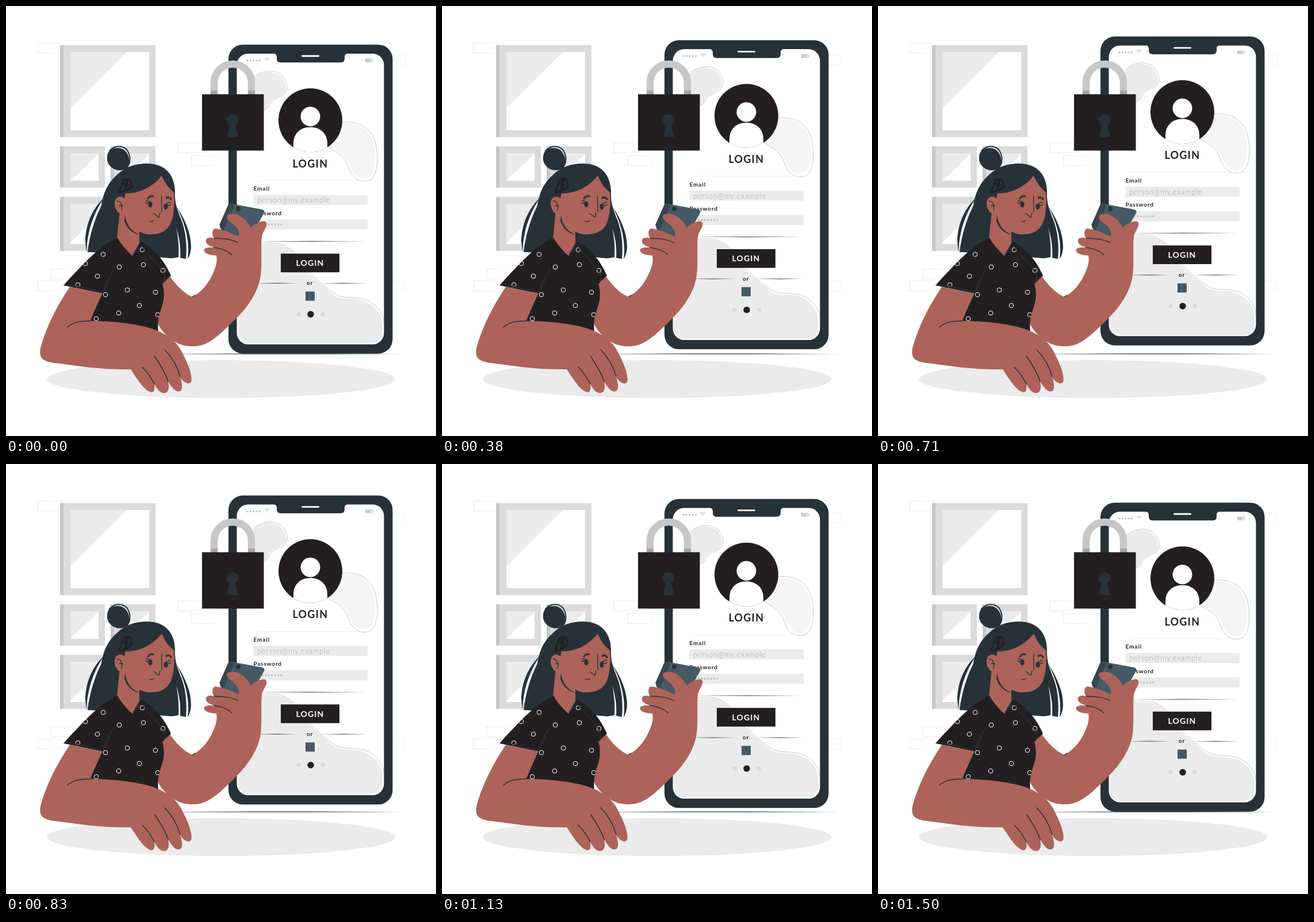
These frames come from a looping animation (748x748 px, 1540 ms). An HTML page:

```html
<!DOCTYPE html>
<html lang="en">
<head>
<meta charset="utf-8">
<title>Login</title>
<style>
  html, body { margin: 0; width: 100%; height: 100%; overflow: hidden; background: #fff; }
  svg { display: block; width: 100vw; height: 100vh; }
  text { font-family: Lato, sans-serif; font-weight: 700; fill: #231f20; }
  .slate { fill: #263238; }
  .ink { fill: #231f20; }
  .skin { fill: #ad6359; }
  .pale { fill: #ebebeb; }
  .line { fill: none; stroke: #263238; stroke-linecap: round; stroke-linejoin: round; }
  .edge { fill: none; stroke: #c9c9c9; }
</style>
</head>
<body>
<svg viewBox="0 0 748 748">
  <defs>
    <clipPath id="screen"><rect x="401.500" y="83" width="256" height="506" rx="20"/></clipPath>
    <clipPath id="avatar"><circle cx="529.500" cy="199" r="55.500"/></clipPath>
    <clipPath id="shirt"><path id="shirtShape" d="M194 403C165 416 139 443 100 486L167 500C160 516 152 533 146 548L160 572H266C261 548 268 535 273 516C276 504 275 493 272 483L287 469C277 447 262 424 235 410L230 424L220 434C208 426 200 414 194 403Z"/></clipPath>
    <linearGradient id="brick"><stop stop-color="#e6e6e6"/><stop offset="1" stop-color="#f5f5f5"/></linearGradient>
  </defs>

  <g id="bricks" fill="none" stroke="url(#brick)"></g>
  <g id="windows"></g>
  <ellipse class="pale" cx="374" cy="649" rx="303" ry="33"/>
  <path class="slate" d="M240 605.200L430 604.600H530L692 605.200L530 605.800H430Z"/>

  <g id="phone">
    <rect class="slate" x="387" y="67.500" width="285.500" height="537.500" rx="25"/>
    <g clip-path="url(#screen)">
      <path fill="#fff" d="M401 83H658V589H401Z"/>
      <path class="pale" d="M430 128C440 116 452 113 464 116C479 119 488 132 487 145C484 158 464 157 457 172C454 180 449 182 430 182Z"/>
      <path class="edge" d="M430 126C441 115 454 112 466 114C481 117 490 131 489 144C486 160 466 157 459 171C456 179 451 181 445 182"/>
      <path fill="#f5f5f5" d="M575 208C602 200 624 207 635 228C643 245 645 266 640 284C636 299 624 303 613 298C601 292 600 279 592 266C584 254 566 252 556 243Z"/>
      <path class="edge" d="M584 203C615 199 636 213 643 240C648 263 647 288 637 300C627 310 608 305 600 291C594 279 592 266 580 258C572 252 563 249 558 243"/>
      <path class="pale" d="M403 440C425 417 452 410 477 416C507 423 515 453 537 475C550 486 561 496 574 506C588 512 608 507 626 515C642 522 654 537 655 553V564C655 579 646 587 632 587H422C411 587 403 577 403 566Z"/>
      <path class="edge" d="M430 419C447 410 473 410 488 419C511 431 520 456 540 475C552 487 564 496 577 504C593 510 613 505 630 513C646 521 657 536 657 552"/>
    </g>
    <path class="slate" d="M465 82H595C590 84 589 86 589 89V92Q589 98.500 582 98.500H478Q471 98.500 471 92V89C471 86 470 84 465 82Z"/>
    <path d="M515.500 87.300H543.500" stroke="#fff" stroke-width="2.800" stroke-linecap="round"/>
    <path d="M420 95H442" stroke="#c7c7c7" stroke-width="3.600" stroke-linecap="round" stroke-dasharray="0 5.300"/>
    <g fill="none" stroke="#c7c7c7" stroke-width="1.200">
      <path d="M449.500 93Q454 89 458.500 93M451.500 95Q454 92.500 456.500 95M453.500 97H454.500"/>
      <path d="M625.500 92.500H636.500V97.500H625.500ZM638 94V96"/>
      <path d="M626 95H634" stroke-width="4"/>
    </g>
    <circle class="ink" cx="529.500" cy="199" r="55.500"/>
    <g fill="#fff" clip-path="url(#avatar)">
      <circle cx="529.500" cy="192.500" r="17"/>
      <path d="M500 260V240C500 221 513 211 529.500 211S559 221 559 240V260Z"/>
    </g>
    <text x="498.500" y="281" font-size="18" letter-spacing="1.200">LOGIN</text>
    <path d="M436 304H621" stroke="#eee"/>
    <text x="430.500" y="321.500" font-size="10" letter-spacing=".9">Email</text>
    <path class="pale" d="M430.500 329H629V346.500H430.500ZM430.500 371.500H629V389H430.500Z"/>
    <text x="437" y="342.500" font-size="13" letter-spacing=".7" style="font-weight:300;fill:#a6a6a6">person@my.example</text>
    <text x="430.500" y="364" font-size="10" letter-spacing=".8">Password</text>
    <path d="M441 380.300H480" stroke="#c4c4c4" stroke-width="3.600" stroke-linecap="round" stroke-dasharray="0 5.400"/>
    <g id="rules" class="slate"></g>
    <path class="ink" d="M478 431H580V463.500H478Z"/>
    <text x="504.500" y="452.300" font-size="14" letter-spacing="1.100" style="fill:#fff">LOGIN</text>
    <text x="523" y="485.500" font-size="10" letter-spacing=".8">or</text>
    <path fill="#455a64" d="M521 497H537V513H521Z"/>
    <g fill="#dbdbdb"><circle cx="509" cy="536.500" r="4"/><circle cx="551" cy="536.500" r="4"/></g>
    <circle class="ink" cx="530" cy="536.500" r="5.700"/>
  </g>

  <g id="lock">
    <path d="M362 154V133.500a32.500 32.500 0 0 1 65 0V154" fill="none" stroke="#c7c7c7" stroke-width="12.500"/>
    <path d="M356 147H368V154H356ZM421 147H433V154H421Z" fill="#a6a6a6"/>
    <path class="ink" d="M341 153.500H448.500V251.500H341Z"/>
    <circle class="slate" cx="394" cy="198.500" r="10.300"/>
    <path class="slate" d="M390 203H398L404 228H385Z"/>
  </g>

  <g id="hair" class="slate">
    <path d="M176 262C177 248 190 245 201 248C213 253 218 269 212 280C205 288 191 287 184 281C178 276 175 270 176 262Z"/>
    <path class="line" stroke-width="2" d="M180 252C190 240 211 241 215 261C217 272 213 279 208 284"/>
    <path d="M245 274C275 274 293 292 294 322C293 345 299 356 305 372C313 393 315 415 313 440L303 438C304 420 302 405 296 385C300 405 301 420 300 437L288 439L200 431L142 428C145 402 152 375 166 347C170 320 180 305 195 292C208 280 225 274 245 274Z"/>
    <path d="M170 334C149 354 138 382 138 410L140 428C141 396 150 364 170 334ZM296 348C312 372 322 395 322 420C321 430 319 436 316 440C320 412 313 380 296 348Z"/>
  </g>

  <g id="head">
    <path class="skin" d="M199 345L193 405L219 435L232 412V388Z"/>
    <path class="slate" d="M207 363C209 382 219 393 233 398C223 397 211 389 206 374Z"/>
    <path class="skin" d="M206 335C198 327 188 334 189 345C190 357 199 366 209 362C214 382 228 394 245 397C264 399 280 393 287 377C292 363 294 345 292 324C283 317 276 308 271 295C254 316 232 326 208 326Z"/>
    <path class="line" stroke-width="1.300" d="M193 339C200 340 203 346 201 355M197 348Q200 346 203 348M270.500 331L271 358M257 361L266 368L268 360M249 374Q253 377 257 373"/>
    <path class="line" stroke-width="3" d="M247 335Q250 330 256 331M279 334Q283 331 287 336"/>
    <g class="slate"><ellipse cx="251" cy="345" rx="3.500" ry="5.200"/><ellipse cx="278" cy="349" rx="3.500" ry="5.200"/></g>
    <path class="line" stroke-width="1.600" d="M250 340L244 339M248 343L243 343M279 344L286 341M281 347L287 346"/>
    <path d="M204 303L209 301L207 322L197 325ZM212 300L216 302L219 315L209 321ZM203 309L215 313" fill="none" stroke="#231f20" stroke-width="3" stroke-linejoin="round"/>
  </g>

  <g id="device">
    <path fill="#455a64" d="M392 344L446 354Q451 356 449 360L422 408L378 396L372 385L386 347Q388 343 392 344Z"/>
    <path fill="#37474f" d="M392 344Q388 343 386 347L371 381L378 391L397 348Z"/>
    <circle class="slate" cx="404" cy="353" r="4"/>
  </g>

  <path class="skin" d="M386 363C402 357 419 371 426 386C432 379 444 373 451 375C457 379 450 388 446 397C443 407 445 430 444 455C444 490 425 519 400 544C382 561 362 584 340 590C330 593 318 592 312 591C288 586 270 567 261 547L266 475L285 470C295 485 310 500 324 506C345 495 357 475 364 455C367 447 367 440 366 434C352 434 342 429 345 423C348 419 358 420 362 420C348 416 346 410 349 405C352 402 358 403 362 404C358 398 358 390 363 387C376 388 391 394 404 401C409 393 400 383 392 377C384 371 382 366 386 363Z"/>
  <path class="line" stroke-width="1.300" d="M362 404C377 404 393 406 404 412M362 420C375 422 386 426 393 433M324 506L329 503"/>

  <use href="#shirtShape" class="ink"/>
  <g id="rings" fill="none" stroke="#fff" clip-path="url(#shirt)"></g>
  <path class="line" stroke-width="1.500" d="M236 416C246 436 269 449 276 470C278 475 275 480 272 483M188 459C178 472 171 486 168 500M172 492L180 475M107 484L166 497"/>

  <path class="skin" d="M111 488.500L167 500L146 548C180 547 235 553 262 564C285 574 299 586 308 606C318 625 325 645 322 654C318 660 309 655 303 646C307 657 308 668 302 670C295 673 287 662 282 653C284 662 284 671 277 673C270 675 262 667 258 657C260 669 256 674 250 671C237 665 226 645 217 632C170 633 130 627 85 621C63 618 57 612 60 595C70 558 88 523 111 488.500Z"/>
  <path class="line" stroke-width="1.400" d="M107 559C116 550 128 548 146 548M237 628C245 636 252 646 258 657M258 609C267 622 277 637 282 653M276 598C287 609 297 624 303 644"/>
</svg>
<script>
const byId = id => document.getElementById(id);
const fill = (id, items, draw) => { byId(id).innerHTML = items.map(item => draw(...item)).join(''); };

fill('bricks', [[55, 64], [299, 238], [323, 260], [78, 457], [55, 478], [628, 64], [652, 85], [652, 478]],
  (x, y) => `<rect x="${x}" y="${y}" width="42" height="17.5"/>`);

// Wall frames: x, y, width, height, length of the reflection
fill('windows', [[94, 68, 166, 160, 98], [94, 244, 78, 72, 50], [182, 244, 78, 72, 50], [94, 332, 166, 94, 68]],
  (x, y, w, h, s) => `<path fill="#dbdbdb" d="M${x} ${y}h${w}v${h}h${-w}z"/>
    <path fill="#c7c7c7" d="M${x} ${y}h6v${h}h-6z"/>
    <path fill="#fff" d="M${x + 18} ${y + 12}h${w - 29}v${h - 24}h${29 - w}z"/>
    <path class="pale" d="M${x + 18} ${y + 12}h${s}l${-s} ${Math.min(s, h - 24)}z"/>`);

fill('rules', [[432, 628, 409.6], [432, 512, 482.6], [546, 628, 482.6]],
  (a, b, y) => `<path d="M${a} ${y}L${(a + b) / 2} ${y - .5}L${b} ${y}L${(a + b) / 2} ${y + .5}Z"/>`);

fill('rings', [[138, 448], [169, 432], [159, 470], [125, 485], [197, 454], [173, 502], [211, 494], [239, 450],
  [260, 498], [232, 521], [196, 534], [157, 544], [273, 460], [237, 424], [264, 537]],
  (x, y) => `<circle cx="${x}" cy="${y}" r="3.8"/>`);

const LOOP = 1540, PERIOD = 1500, LEAD = 25, RISE = 15, REST = 0.2;

function render(now) {
  const phase = ((now % LOOP + LEAD) % PERIOD) / PERIOD;
  const lift = RISE * (1 - Math.abs(1 - 2 * phase));
  byId('phone').setAttribute('transform', `translate(0 ${(REST - lift).toFixed(2)})`);
}

const start = performance.now();
(function tick() {
  render(performance.now() - start);
  requestAnimationFrame(tick);
})();
</script>
</body>
</html>
```
